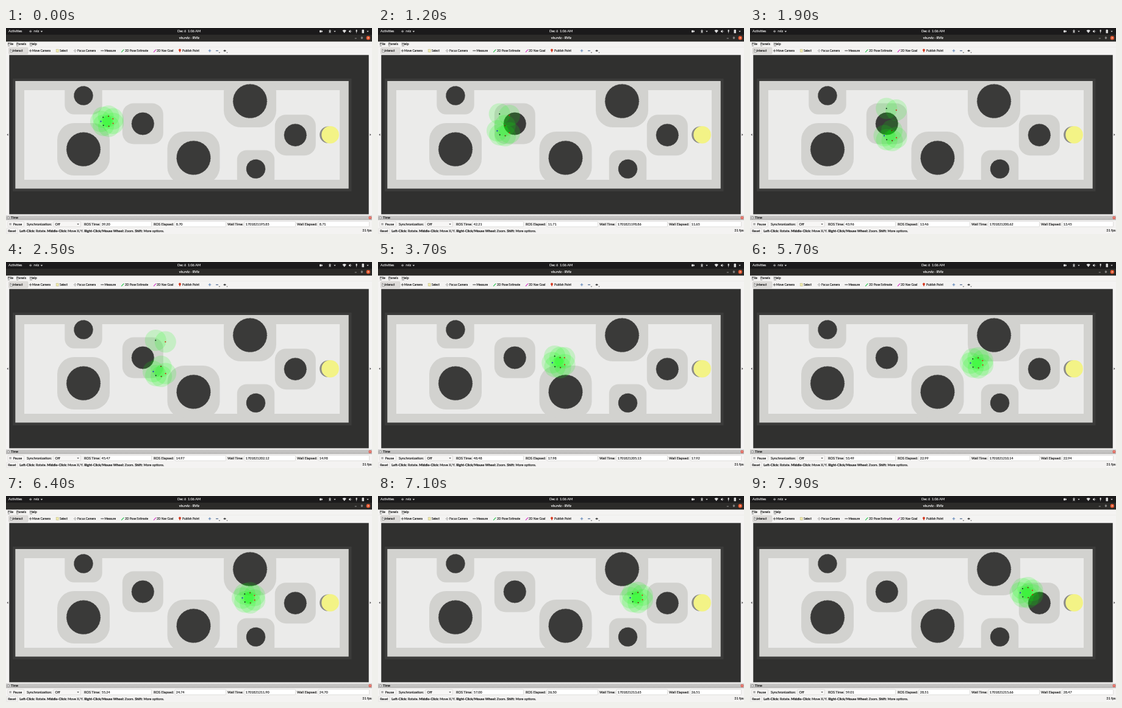
These frames come from a looping animation (600x338 px, 8 s). An HTML page:

```html
<!DOCTYPE html>
<html lang="en">
<head>
<meta charset="utf-8">
<title>Robot swarm in RViz</title>
<style>
html, body { margin: 0; width: 100%; height: 100%; overflow: hidden; background: #f4f3f2; }
svg { display: block; width: 100%; height: 100%; }
text { font: 5.5px Lato, "Open Sans", sans-serif; fill: #111; stroke: #111; stroke-width: .13; white-space: pre; }
.top text { fill: #eee; stroke: #eee; }
.top .title { font-weight: 700; font-size: 5.6px; }
.menu text { font-size: 5.7px; }
.tools text { font-size: 4.9px; }
.labels text { font-size: 5.65px; }
.values text { font-size: 5.4px; }
.b { font-weight: 700; }
.field { fill: #fff; stroke: #c2c0be; stroke-width: .5; }
.button { fill: #f7f6f5; stroke: #c8c6c4; stroke-width: .5; }
.halo { fill: #0f0; opacity: .155; }
</style>
</head>
<body>
<svg viewBox="0 0 600 338" preserveAspectRatio="none">
  <defs>
    <linearGradient id="head" x2="0" y2="1">
      <stop stop-color="#cbcac9"/><stop offset="1" stop-color="#b9b8b7"/>
    </linearGradient>
    <clipPath id="map"><rect x="15.3" y="87" width="546.4" height="176.5"/></clipPath>
  </defs>
  <rect width="600" height="338" fill="#f4f3f2"/>

  <g class="top">
    <rect width="600" height="11" fill="#1b1a1b"/>
    <rect y="11" width="600" height="11.3" fill="#2c2b29"/>
    <text x="4" y="7.4">Activities</text>
    <path d="M38 5.5h4.4M40.2 3.3v4.4M38.7 4l3 3M41.7 4l-3 3" stroke="#aaa" stroke-width=".7"/>
    <text x="45.5" y="7.4">rviz</text>
    <path d="M56.6 4.7h3.6l-1.8 2.2z" fill="#ddd"/>
    <text x="281" y="7.4">Dec 6  1:06 AM</text>
    <text class="title" x="300.5" y="18.4" text-anchor="middle">vis.rviz - RViz</text>
    <g fill="#ddd">
      <rect x="514" y="3.8" width="3.4" height="3.4" rx=".6"/><path d="M517 5.5l2-1.5v3z"/>
      <circle cx="531" cy="3.6" r=".8"/><path d="M528.8 4.6h4.4v.7h-1.4l.8 3h-.8l-.8-2-.8 2h-.8l.8-3h-1.4z"/>
      <path d="M537.3 4.7h3.4l-1.7 2.1z"/>
      <path d="M551.5 4.3q3.2-2.5 6.4 0l-3.2 4z"/>
      <path d="M562 4.6h1.2l1.6-1.6v5l-1.6-1.6H562z"/>
      <rect x="573.6" y="2.8" width="2" height="3.6" rx="1"/><path d="M574.3 6h.6v2.4h-.6z"/>
      <path d="M583.5 3h1v-.6h1.4V3h1v5.4h-3.4zM591.3 4.7h3.4l-1.7 2.1z"/>
    </g>
    <path d="M565.8 4.2q1.4 1.3 0 2.6" fill="none" stroke="#ddd" stroke-width=".5"/>
    <path d="M571.8 17h3" stroke="#ddd" stroke-width=".6"/>
    <rect x="582.4" y="15" width="2.2" height="2.2" fill="none" stroke="#ddd" stroke-width=".6"/>
    <circle cx="593.8" cy="16.2" r="3.2" fill="#e2542c"/>
    <path d="M592.6 15l2.4 2.4M595 15l-2.4 2.4" stroke="#fff" stroke-width=".6"/>
  </g>

  <g class="menu">
    <text x="3" y="28.3">File</text><text x="17" y="28.3">Panels</text><text x="39" y="28.3">Help</text>
    <path d="M3 29.3h3M17 29.3h3.2M39 29.3h4" stroke="#222" stroke-width=".5"/>
  </g>

  <g class="tools">
    <path d="M0 31.2h600" stroke="#e2e0de" stroke-width=".5"/>
    <rect x="4.5" y="32.2" width="31.5" height="10.4" rx="1.5" fill="#dddbd9" stroke="#c3c1bf" stroke-width=".5"/>
    <path d="M7 39.6v-4.6h1v2h2.6v2.6z" fill="#fff" stroke="#444" stroke-width=".5"/>
    <path d="M37.8 37.3h4.6M40.1 35v4.6" stroke="#555" stroke-width="1"/>
    <rect x="82.3" y="35" width="4" height="4.4" fill="#f2ecac" stroke="#8b8644" stroke-width=".5" stroke-dasharray="1 .6"/>
    <path d="M110.8 37.3h5M113.3 34.8v5" stroke="#777" stroke-width=".7"/>
    <circle cx="113.3" cy="37.3" r="1.2" fill="#f4f3f2" stroke="#777" stroke-width=".4"/>
    <path d="M155.3 37.3h5.2" stroke="#777" stroke-width="1.6"/>
    <path d="M189.2 39.6l4-4.2" stroke="#18c040" stroke-width="1.1"/>
    <path d="M242 39.6l4-4.2" stroke="#d11fc0" stroke-width="1.1"/>
    <path d="M285 40.2l-1.8-3.4a1.9 1.9 0 1 1 3.6 0z" fill="#d4351c"/>
    <path d="M331.7 37.3h4.6M334 35v4.6" stroke="#5d84b8" stroke-width="1.1"/>
    <path d="M344 37.3h4" stroke="#3f5c85" stroke-width="1.1"/>
    <path d="M348.6 39.8h2.6l-1.3 1.5zM361.4 39.8h2.2l-1.1 1.5z" fill="#555"/>
    <circle cx="358.6" cy="37.3" r="1.5" fill="#444"/>
    <path d="M356 37.3h5.2" stroke="#444" stroke-width=".6"/>
  </g>

  <rect x="5.3" y="44.3" width="589.4" height="261.3" fill="#30302f"/>
  <path d="M3.5 173.3v3.6l-2-1.8zM596.5 173.3v3.6l2-1.8z" fill="#444"/>
  <rect x="11" y="83" width="555.5" height="185" fill="#3b3b3a"/>
  <g clip-path="url(#map)">
    <rect x="15" y="87" width="547" height="177" fill="#d2d2cf"/>
    <rect x="30" y="102" width="517" height="147" fill="#ebebea"/>
    <g id="zones" fill="#d2d2cf"></g>
  </g>
  <g id="pillars" fill="#3a3a39"></g>
  <circle cx="528" cy="175.2" r="13.8" fill="#8b8b89"/>
  <circle cx="531.6" cy="175.2" r="14.3" fill="#f3f386"/>
  <g id="halos"></g>
  <g id="dots"></g>

  <rect y="307.6" width="600" height="7.6" fill="url(#head)"/>
  <circle cx="3.8" cy="311.4" r="1.7" fill="#eee" stroke="#666" stroke-width=".6"/>
  <text x="8" y="313.4">Time</text>
  <rect x="594.7" y="309.2" width="4.2" height="4.2" rx=".8" fill="#e04a3c"/>
  <path d="M595.8 310.3l2 2M597.8 310.3l-2 2" stroke="#fff" stroke-width=".6"/>
  <rect class="button" x="3" y="317.3" width="26.5" height="8.8" rx="1.2"/>
  <path d="M6.2 320v3.6M8 320v3.6" stroke="#555" stroke-width=".8"/>
  <rect class="button" x="78" y="317.3" width="44.5" height="8.8" rx="1.2"/>
  <path d="M116.4 321h3.4l-1.7 2z" fill="#555"/>
  <g class="labels" id="labels">
    <text x="11.5" y="323.7">Pause</text>
    <text x="34" y="323.7">Synchronization:</text>
    <text x="80.5" y="323.7">Off</text>
  </g>
  <g class="values" id="values"></g>
  <rect class="button" x="1" y="328.6" width="18.2" height="9" rx="1.2"/>
  <text x="3.2" y="335">Reset</text>
  <text x="22.3" y="334.8"><tspan class="b">Left-Click:</tspan> Rotate. <tspan class="b">Middle-Click:</tspan> Move X/Y. <tspan class="b">Right-Click/Mouse Wheel:</tspan> Zoom. <tspan class="b">Shift:</tspan> More options.</text>
  <text x="599.5" y="334.2" text-anchor="end">31 fps</text>
</svg>

<script>
const LOOP = 8000, STEP = 100, ROBOTS = 7;
const $ = id => document.getElementById(id);

function add(parent, tag, attrs, text) {
  const el = document.createElementNS('http://www.w3.org/2000/svg', tag);
  for (const k in attrs) el.setAttribute(k, attrs[k]);
  if (text) el.textContent = text;
  parent.appendChild(el);
  return el;
}

const tools = [[11, 'Interact'], [43, 'Move Camera'], [88, 'Select'], [117, 'Focus Camera'], [161.5, 'Measure'],
  [195, '2D Pose Estimate'], [247, '2D Nav Goal'], [289, 'Publish Point']];
for (const [x, name] of tools) add(document.querySelector('.tools'), 'text', { x, y: 39 }, name);

// Each pillar's keep-out zone is its circle swept by a square.
const SMALL = 15.5, MEDIUM = 18.3, LARGE = 27.8, MARGIN = 15.2;
const pillars = [[127, 111, SMALL], [409.5, 231.2, SMALL], [224.3, 157, MEDIUM], [474.3, 175.7, MEDIUM],
  [127, 199, LARGE], [307.5, 213, LARGE], [400, 120, LARGE]];
for (const [cx, cy, r] of pillars) {
  const h = r + MARGIN;
  add($('zones'), 'rect', { x: cx - h, y: cy - h, width: 2 * h, height: 2 * h, rx: r });
  add($('pillars'), 'circle', { cx, cy, r, stroke: '#3a3a39', 'stroke-width': .9, 'stroke-dasharray': '1.2 2.3 .7 1.5' });
}

const fields = [[128, 155, 'ROS Time:'], [242, 277, 'ROS Elapsed:'], [363, 391, 'Wall Time:'], [477, 512, 'Wall Elapsed:']];
const values = fields.map(([lx, x, name]) => {
  add($('labels'), 'text', { x: lx, y: 323.7 }, name);
  add($('values'), 'rect', { x, y: 317.3, width: 83.5, height: 8.8, rx: 1.2, class: 'field' });
  return add($('values'), 'text', { x: x + 1.8, y: 323.7 });
});

// Swarm centre over time; lift raises the pair that passes above the pillar.
const path = [
  { t: 0, x: 166, y: 153, lift: 0 },
  { t: 1200, x: 206, y: 168.5, lift: 21 },
  { t: 2500, x: 252, y: 179.5, lift: 44.5 },
  { t: 3700, x: 296.4, y: 165, lift: 4 },
  { t: 4500, x: 327, y: 160, lift: 1 },
  { t: 5700, x: 372, y: 165.6, lift: 0 },
  { t: 7100, x: 424, y: 166.7, lift: 0 },
  { t: 7900, x: 453.6, y: 158.6, lift: 0 }
];

// The robots keep a ring around the centre.
const tints = ['#10261a', '#7a1c10', '#e01a10', '#e01a10', '#7a1c10', '#10261a', '#1414d8'];
const robots = Array.from({ length: ROBOTS }, (_, i) => {
  const angle = (230 + i * 360 / ROBOTS) * Math.PI / 180;
  return {
    dx: 10.5 * Math.cos(angle),
    dy: 8.5 * Math.sin(angle),
    upper: i === 0 || i === 2,
    halo: add($('halos'), 'circle', { r: 17.6, class: 'halo' }),
    dot: add($('dots'), 'circle', { r: 1, fill: tints[i] })
  };
});

function slope(key, i) {
  const a = path[Math.max(i - 1, 0)], b = path[Math.min(i + 1, path.length - 1)];
  return (b[key] - a[key]) / (b.t - a.t);
}

function smooth(key, t) {
  let i = 0;
  while (i < path.length - 2 && t >= path[i + 1].t) i++;
  const a = path[i], b = path[i + 1], d = b.t - a.t, s = (t - a.t) / d, q = 1 - s;
  return a[key] * (1 + 2 * s) * q * q + b[key] * s * s * (3 - 2 * s)
    + d * (slope(key, i) * s * q * q - slope(key, i + 1) * s * s * q);
}

function draw(t) {
  const x = smooth('x', t), y = smooth('y', t), lift = smooth('lift', t);
  for (const { dx, dy, upper, halo, dot } of robots) {
    for (const c of [halo, dot]) {
      c.setAttribute('cx', x + dx);
      c.setAttribute('cy', y + dy - (upper ? lift : 0));
    }
  }
  const elapsed = 8.7 + t * .002507;
  const jitter = .035 * Math.cos(2 * Math.PI * t / 2400) - .025;
  [elapsed + 30.5, elapsed, elapsed + 1701821187.154, elapsed + jitter]
    .forEach((n, i) => values[i].textContent = n.toFixed(2));
}

const start = performance.now();
function tick() {
  const t = (performance.now() - start) % LOOP;
  draw(Math.floor(t / STEP) * STEP);
  requestAnimationFrame(tick);
}
tick();
</script>
</body>
</html>
```
